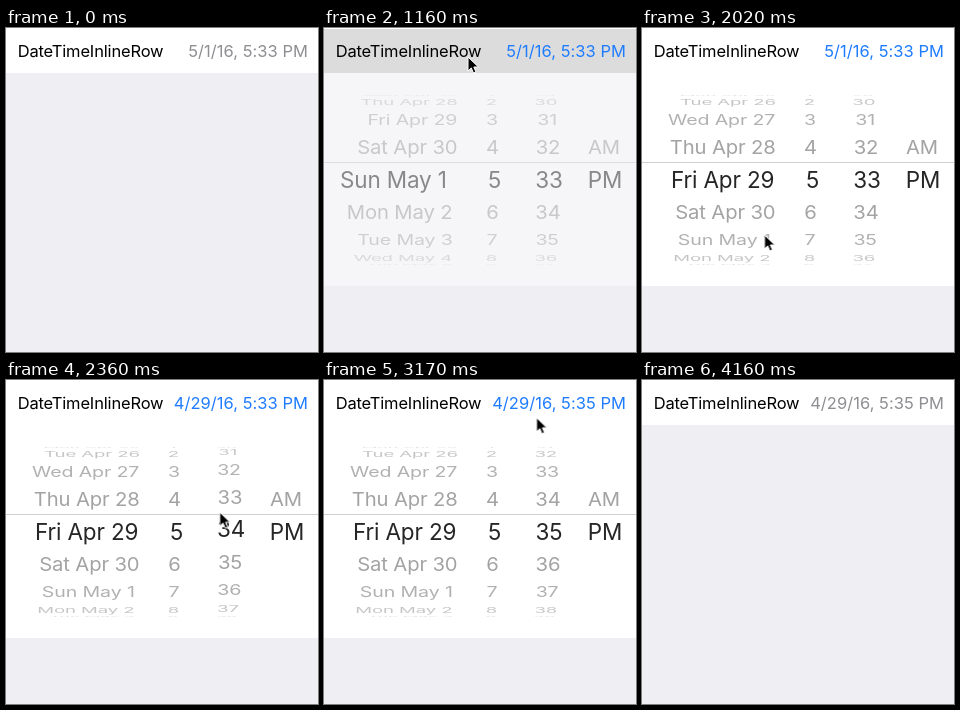
These frames come from a looping animation (312 px wide and 324 px high, 5.23 s). An HTML page:

```html
<!DOCTYPE html>
<html lang="en">
<head>
<meta charset="utf-8">
<title>Inline date picker</title>
<style>
@property --off { syntax: "<number>"; inherits: true; initial-value: 0; }

:root { --loop: 5230ms linear infinite; }
html, body { margin: 0; width: 100%; height: 100%; overflow: hidden; }
body {
  position: relative;
  background: #eeeef3;
  font-family: Inter, Roboto, "Liberation Sans", sans-serif;
}

.head {
  position: absolute; inset: 0 0 auto; height: 45px;
  background: #fff; color: #000;
  font-size: 16.5px; line-height: 46px; letter-spacing: -.16px; white-space: nowrap;
}
.press { position: absolute; inset: 1px 0 0; background: #d9d9d9; opacity: 0; animation: press var(--loop); }
.title { position: absolute; left: 11.7px; }
.value { letter-spacing: .04px; color: #8e8e93; animation: tint var(--loop); }
.value span { position: absolute; right: 10px; opacity: 0; }
.value span:nth-child(1) { animation: first var(--loop); }
.value span:nth-child(2) { animation: second var(--loop); }
.value span:nth-child(3) { animation: third var(--loop); }

.picker {
  position: absolute; top: 45px; left: 0; width: 100%; height: 213px;
  overflow: hidden; background: #fff; opacity: 0;
  font-size: 22.5px; letter-spacing: -.15px;
  animation: reveal var(--loop);
}
.drum { color: #a3a3a3; }
.band {
  position: absolute; top: 89px; left: 0; width: 100%; height: 33px;
  overflow: hidden; background: #fff; color: #262626;
  border-top: 1px solid #d0d0d0;
}

.col { position: absolute; top: 107px; width: 60px; text-align: center; }
.band .col { top: 17px; }
.date { left: 0; width: 133.5px; animation: spin-date var(--loop); }
.hour { left: 139.5px; }
.minute { left: 197px; animation: spin-minute var(--loop); }
.half { left: 249.5px; }
.band .date { width: 132.3px; }
.band .hour { left: 140.5px; }
.band .minute { left: 195px; }
.band .half { left: 251px; }

.item {
  position: absolute; top: -15px; left: 0; right: 0;
  height: 30px; line-height: 30px; white-space: nowrap;
}
.date .item { left: auto; transform-origin: right; }
.hour .item { transform-origin: 25%; }
.minute .item { transform-origin: left; }
.date .short { right: 5.2px; }
.band .date .short { right: 9.5px; }

/* Outer rows wrap round a cylinder; the centre band scrolls flat. */
.drum .item {
  --a: calc((var(--i) - var(--off)) * 22.5deg);
  --c: cos(var(--a));
  transform:
    translateY(calc(sin(var(--a)) * 84.6px))
    scale(calc(.775 + .135 * var(--c)), max(.9 * var(--c), .05));
  opacity: min(.35 + .7 * var(--c), 20 * (var(--c) + .05));
}
.band .item { transform: translateY(calc((var(--i) - var(--off)) * 33px)); }

.cursor { position: absolute; top: 0; left: 0; animation: travel var(--loop); }

@keyframes press {
  0%, 18.92% { opacity: 0; }
  18.93%, 21.6% { opacity: 1; }
  28.7%, 68.25% { opacity: 0; }
  68.26%, 70.2% { opacity: 1; }
  72.5%, 100% { opacity: 0; }
}
@keyframes tint {
  0%, 18.92% { color: #8e8e93; }
  18.93%, 70.7% { color: #1f7cff; }
  70.71%, 100% { color: #8e8e93; }
}
@keyframes first {
  0%, 39.57% { opacity: 1; }
  39.58%, 100% { opacity: 0; }
}
@keyframes second {
  0%, 39.57% { opacity: 0; }
  39.58%, 57.35% { opacity: 1; }
  57.36%, 100% { opacity: 0; }
}
@keyframes third {
  0%, 57.35% { opacity: 0; }
  57.36%, 100% { opacity: 1; }
}
@keyframes reveal {
  0%, 19.31% { opacity: 0; }
  25.05%, 70.2% { opacity: 1; }
  75.9%, 100% { opacity: 0; }
}
@keyframes spin-date {
  0%, 32.2% { --off: 0; }
  37.67% { --off: -1.87; animation-timing-function: ease-out; }
  38.55%, 100% { --off: -2; }
}
@keyframes spin-minute {
  0%, 41.87% { --off: 0; }
  48.37%, 51.95% { --off: 2.15; animation-timing-function: ease-out; }
  55.5%, 100% { --off: 2; }
}
@keyframes travel {
  0%, 5.73% { transform: translate(400px, 71px); }
  5.74% { transform: translate(297px, 71px); animation-timing-function: ease-out; }
  15.49%, 29.4% { transform: translate(143px, 28px); }
  32.2% { transform: translate(89px, 145px); }
  37.6%, 39.56% { transform: translate(121.5px, 206px); }
  39.58% { transform: translate(191px, 190px); }
  41.87% { transform: translate(215px, 167px); }
  48.37%, 51.95% { transform: translate(210.5px, 96px); }
  56.4% { transform: translate(206px, 62px); }
  61.76% { transform: translate(213px, 30px); }
  68.26%, 71.2% { transform: translate(217px, 22px); animation-timing-function: ease-in; }
  79.1%, 100% { transform: translate(316px, 60px); }
}
</style>
</head>
<body>
<div class="head">
  <div class="press"></div>
  <span class="title">DateTimeInlineRow</span>
  <div class="value">
    <span>5/1/16, 5:33 PM</span>
    <span>4/29/16, 5:33 PM</span>
    <span>4/29/16, 5:35 PM</span>
  </div>
</div>
<div class="picker">
  <div class="drum"></div>
  <div class="band"></div>
</div>
<svg class="cursor" width="13" height="19" viewBox="0 0 13 19">
  <path d="M1 1v14l3.3-3.1 2.1 5 2.5-1.1-2.1-4.8h4.6z" fill="#000" stroke="#fff"/>
</svg>
<script>
const dayLabel = i => {
  const day = new Date(2016, 4, 1 + i);
  return day.toDateString().slice(0, 7) + ' ' + day.getDate();
};

// Rows are numbered from the initially selected one.
const columns = [
  { name: 'date', from: -6, to: 4, label: dayLabel },
  { name: 'hour', from: -4, to: 4, label: i => 5 + i },
  { name: 'minute', from: -4, to: 7, label: i => 33 + i },
  { name: 'half', from: -1, to: 0, label: i => i ? 'AM' : 'PM' }
];

function addColumn(parent, { name, from, to, label }) {
  const col = document.createElement('div');
  col.className = 'col ' + name;
  for (let i = from; i <= to; i++) {
    const item = document.createElement('div');
    item.className = 'item';
    item.textContent = label(i);
    item.classList.toggle('short', / \d$/.test(item.textContent));
    item.style.setProperty('--i', i);
    col.append(item);
  }
  parent.append(col);
}

for (const layer of document.querySelectorAll('.drum, .band')) {
  columns.forEach(column => addColumn(layer, column));
}
</script>
</body>
</html>
```
